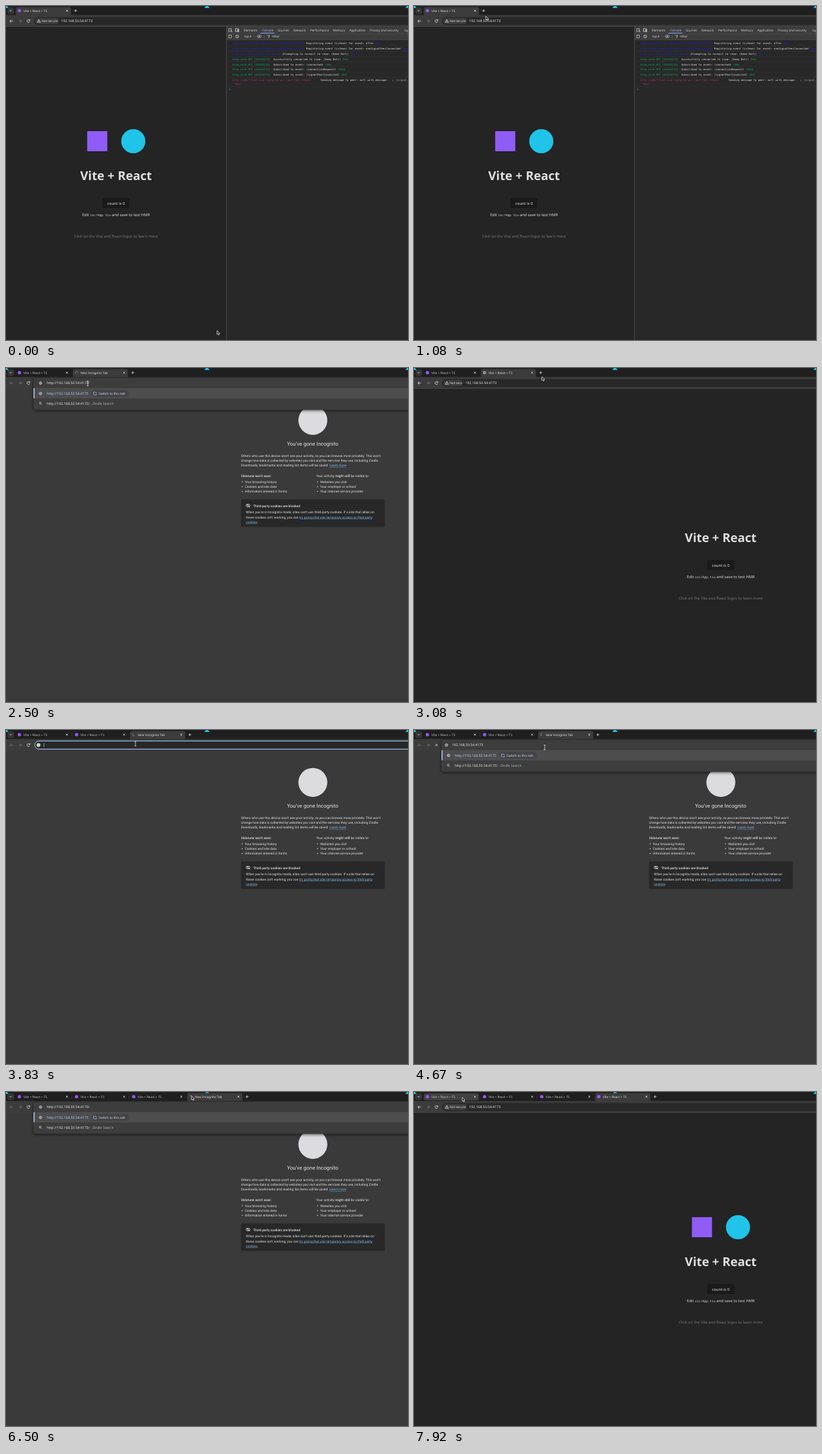
These frames come from a looping animation (600 by 499 pixels, 8000 ms). An HTML page with a canvas:

```html
<!DOCTYPE html>
<html lang="en">
<head>
<meta charset="utf-8">
<title>Opening peers in new tabs</title>
<style>
  html, body { margin: 0; width: 600px; height: 499px; overflow: hidden; background: #242424; }
  canvas { display: block; }
</style>
</head>
<body>
<canvas id="stage" width="600" height="499"></canvas>
<script>
const c = document.getElementById('stage').getContext('2d');
const LOOP = 8000, PITCH = 85.3;
const SANS = '"Noto Sans", sans-serif', ROBOTO = 'Roboto, sans-serif', MONO = '"DejaVu Sans Mono", monospace';
const HOST = '192.168.50.54:4173';
const BAR = '#3c3c3c', PILL = '#282828', LIGHT = '#e3e3e3', DIM = '#777', LINK = '#7fb2e8', CYAN = '#1fc4e8', PURPLE = '#8f5cf5';

// Life of each new tab, in ms
const sessions = [
  { open: -1e4, paste: -1e4, enter: -1e4, load: -1e4, icons: -1e4 },
  { open: 1575, paste: 2080, chip: 2330, enter: 2580, load: 3010, icons: 3170 },
  { open: 3500, paste: 4000, chip: 4170, enter: 4500, load: 4840, icons: 5000 },
  { open: 5825, paste: 6080, chip: 6500, enter: 6670, load: 6920, icons: 7080 }
];

// Pointer stops: time, x, y
const pointerPath = [
  [0, 315, 485], [200, 315, 485], [1150, 104, 8], [1560, 104, 8], [1670, 115, 15], [1950, 122, 23],
  [2580, 122, 23], [3080, 191, 13], [3350, 189, 8], [3550, 189, 8], [4000, 195, 26],
  [4900, 195, 26], [5600, 277, 6], [6800, 277, 6], [7850, 72, 8], [8000, 72, 8]
];

const clamp = v => Math.max(0, Math.min(1, v));

function pointerAt(t) {
  const i = pointerPath.findIndex(p => p[0] > t);
  const [t0, x0, y0] = pointerPath[i - 1], [t1, x1, y1] = pointerPath[i];
  const u = (t - t0) / (t1 - t0), e = u * u * (3 - 2 * u);
  return { x: x0 + (x1 - x0) * e, y: y0 + (y1 - y0) * e };
}

// Draws text and returns its right edge
function text(s, x, y, size, color, family = SANS, weight = 400, align = 'left') {
  c.font = `${weight} ${size}px ${family}`;
  c.fillStyle = color;
  c.textAlign = align;
  c.fillText(s, x, y);
  return x + c.measureText(s).width;
}

function rect(x, y, w, h, color, r = 0) {
  c.fillStyle = color;
  c.beginPath();
  c.roundRect(x, y, w, h, r);
  c.fill();
}

function dot(x, y, r, color) {
  c.fillStyle = color;
  c.beginPath();
  c.arc(x, y, r, 0, 7);
  c.fill();
}

function ring(x, y, r, color, from = 0, to = 7) {
  c.strokeStyle = color;
  c.lineWidth = 0.8;
  c.beginPath();
  c.arc(x, y, r, from, to);
  c.stroke();
}

function line(color, width, ...pts) {
  c.strokeStyle = color;
  c.lineWidth = width;
  c.beginPath();
  for (let i = 0; i < pts.length; i += 2) c.lineTo(pts[i], pts[i + 1]);
  c.stroke();
}

function cross(x, y, r, color) {
  line(color, 0.8, x - r, y - r, x + r, y + r);
  line(color, 0.8, x + r, y - r, x - r, y + r);
}

function plus(x, y, color) {
  line(color, 0.8, x - 2, y, x + 2, y);
  line(color, 0.8, x, y - 2, x, y + 2);
}

function arrow(x, y, dir, color) {
  line(color, 0.8, x - 2.2, y, x + 2.2, y);
  line(color, 0.8, x, y - 2.2, x + 2.2 * dir, y, x, y + 2.2);
}

function globe(x, y) {
  ring(x, y, 2, '#c8c8c8');
  line('#c8c8c8', 0.6, x - 2, y, x + 2, y);
  line('#c8c8c8', 0.6, x, y - 2, x, y + 2);
}

function link(s, x, y) {
  const end = text(s, x, y, 4.97, LINK, ROBOTO);
  line(LINK, 0.4, x, y + 0.9, end, y + 0.9);
  return end;
}

function drawTabs(t, active, mouse) {
  rect(0, 0, 600, 14, '#1f1f1f');
  for (const x of [0, 300, 600]) {
    c.fillStyle = CYAN;
    c.beginPath();
    c.moveTo(x - 4, 3);
    c.lineTo(x - 1.5, 0);
    c.lineTo(x + 1.5, 0);
    c.lineTo(x + 4, 3);
    c.fill();
  }
  rect(2, 2, 10, 10, '#353535', 3);
  line(LIGHT, 0.8, 5.4, 6.2, 7, 7.8, 8.6, 6.2);

  let right = 0;
  sessions.forEach((s, i) => {
    if (t < s.open) return;
    const x = 14.5 + PITCH * i;
    right = x + PITCH * clamp((t - s.open) / 235) - 2.8;
    const w = right - x, on = i === active;
    const hover = mouse.y < 13 && mouse.x > x && mouse.x < right;
    if (on) rect(x, 1.5, w, 14, BAR, 3);
    else if (hover) rect(x, 2, w, 10.5, '#414141', 3);
    else if (i < active - 1) line('#4a4a4a', 0.6, right + 1.4, 4.5, right + 1.4, 9.5);
    c.save();
    c.beginPath();
    c.rect(x, 0, Math.max(0, w - 11), 14);
    c.clip();
    const loaded = t >= s.load;
    if (t >= s.icons) dot(x + 5.5, 7, 2.5, PURPLE);
    else if (loaded) globe(x + 5.5, 7);
    else ring(x + 5.5, 7, 1.8, '#999', t / 120, t / 120 + 4);
    text(loaded ? 'Vite + React + TS' : 'New Incognito Tab', x + 11.5, 8.8, 4.63, on ? LIGHT : '#c4c4c4');
    c.restore();
    if (w > 12) cross(right - 6, 7, 1.4, '#ddd');
  });

  const px = right + 6.8;
  if (Math.hypot(mouse.x - px, mouse.y - 7) < 5.5) dot(px, 7, 5, '#505050');
  plus(px, 7, '#ddd');
}

function drawToolbar(t, s) {
  const loaded = t >= s.load;
  rect(0, 13.5, 600, 17.5, BAR);
  arrow(8, 22.5, -1, loaded ? LIGHT : DIM);
  arrow(21, 22.5, 1, DIM);
  if (!loaded && (t < s.open + 170 || t >= s.enter)) cross(33.5, 22.5, 1.6, LIGHT);
  else {
    ring(33.5, 22.5, 2, LIGHT, 0.4, 5.5);
    line(LIGHT, 0.8, 35.6, 20, 35.6, 21.7, 33.9, 21.7);
  }
  if (loaded) {
    rect(42, 16.5, 580, 12, PILL, 6);
    const w = Math.min(35, 18 + (t - s.load) * 0.16);
    rect(44, 18, w, 9, BAR, 4.5);
    c.save();
    c.beginPath();
    c.rect(44, 17, w - 2, 11);
    c.clip();
    line(LIGHT, 0.7, 49, 20, 51.4, 24.3, 46.6, 24.3, 49, 20);
    line(LIGHT, 0.6, 49, 21.5, 49, 23.3);
    text('Not secure', 53.3, 24.4, 4.7, LIGHT);
    c.restore();
    text(HOST, 47.3 + w, 24.4, 5.17, LIGHT);
    line('#484848', 0.6, 0, 30.7, 600, 30.7);
  } else if (t < s.paste) {
    rect(43, 16.5, 580, 12, PILL, 6);
    c.strokeStyle = '#a8c7fa';
    c.lineWidth = 1;
    c.beginPath();
    c.roundRect(43, 16.5, 580, 12, 6);
    c.stroke();
    dot(48.5, 22.5, 2.9, '#c9d3c4');
    line(LIGHT, 0.6, 56.8, 19.5, 56.8, 25.5);
  } else drawSuggestions(t, s);
}

function drawSuggestions(t, s) {
  c.save();
  c.shadowColor = '#000a';
  c.shadowBlur = 4;
  c.shadowOffsetY = 1;
  rect(41, 15, 580, 47.5, '#3d3d3d', 4);
  c.restore();
  if (t < s.enter) {
    globe(51.5, 22.5);
    text(`http://${HOST}/`, 60.7, 24.4, 5.17, LIGHT);
  } else {
    globe(48.5, 22.5);
    text(HOST, 56.5, 24.4, 5.17, LIGHT);
  }
  rect(41, 30, 560, 15.5, '#4d4d4e');
  rect(41, 30, 1.5, 15.5, '#a8c7fa', 0.7);
  globe(51.5, 38);
  text(`http://${HOST}`, 60.7, 39.8, 5.17, '#a8c7fa', SANS, 500);
  if (t >= s.chip) {
    rect(127, 33, 56, 10, '#434345', 5);
    line('#a8c7fa', 0.7, 133, 36, 130.5, 36, 130.5, 40, 135, 40, 135, 38);
    line('#a8c7fa', 0.7, 133, 36.5, 135.5, 36.5);
    text('Switch to this tab', 138.3, 39.8, 4.9, '#cfdcf2');
  }
  ring(51, 52.4, 1.4, '#c8c8c8');
  line('#c8c8c8', 0.8, 52, 53.4, 53.4, 54.8);
  const end = text(`http://${HOST}/`, 60.7, 54.9, 5.17, LIGHT);
  text(' - Zindle Search', end, 54.9, 5, '#b4b4b4');
}

function drawApp(cx, logos) {
  rect(0, 31, 600, 468, '#242424');
  if (logos) {
    rect(cx - 43, 187, 30, 30, PURPLE);
    dot(cx + 25.8, 202, 18, CYAN);
  }
  text('Vite + React', cx, 260, 18.2, '#e0e0e0', SANS, 700, 'center');
  rect(cx - 20.3, 287, 40.6, 15, '#1a1a1a', 3);
  text('count is 0', cx, 296.6, 5.75, '#e8e8e8', SANS, 500, 'center');
  let x = text('Edit ', cx - 50.5, 314.4, 5.72, '#dcdcdc');
  x = text('src/App.tsx', x, 314.4, 4.72, '#dcdcdc', '"Noto Sans Mono", monospace');
  text(' and save to test HMR', x, 314.4, 5.72, '#dcdcdc');
  text('Click on the Vite and React logos to learn more', cx, 345.8, 5.72, '#767676', SANS, 400, 'center');
}

function drawDevtools() {
  rect(329, 31, 271, 468, PILL);
  rect(329, 31, 271, 19.5, BAR);
  line('#5a5a5a', 0.7, 329, 31, 329, 499);
  line('#545454', 0.5, 329, 41, 600, 41);
  line('#545454', 0.5, 329, 50.5, 600, 50.5);
  c.strokeStyle = '#c8c8c8';
  c.lineWidth = 0.7;
  c.strokeRect(332.5, 34, 4, 4);
  line('#c8c8c8', 0.9, 335, 36, 338, 39);
  c.strokeRect(342.5, 34, 4.5, 4);
  rect(345.5, 35, 2, 4, '#c8c8c8');
  const names = ['Elements', 'Console', 'Sources', 'Network', 'Performance', 'Memory', 'Application', 'Privacy and security', 'Lighthouse'];
  const lefts = [355, 382, 405.5, 429, 454, 488, 512.5, 543, 594.5];
  names.forEach((n, i) => text(n, lefts[i], 37.8, 4.6, i === 1 ? '#a8c7fa' : '#d4d4d4'));
  rect(380, 40, 20.5, 1, '#7cacf8');

  c.strokeStyle = '#c8c8c8';
  c.lineWidth = 0.7;
  c.strokeRect(332.5, 43.5, 4, 4);
  ring(345, 45.5, 2.2, '#c8c8c8');
  line('#c8c8c8', 0.7, 343.5, 44, 346.5, 47);
  text('top ▾', 355.5, 47.2, 4.6, '#d4d4d4');
  c.beginPath();
  c.ellipse(378, 45.5, 3, 1.8, 0, 0, 7);
  c.stroke();
  dot(378, 45.5, 0.9, '#c8c8c8');
  line('#5a5a5a', 0.6, 371, 43, 371, 48);
  line('#5a5a5a', 0.6, 385.5, 43, 385.5, 48);
  line('#c8c8c8', 0.7, 390, 44, 394, 44, 392, 46, 392, 48);
  text('Filter', 397.5, 47.2, 4.6, '#d4d4d4');

  const blue = '#2020dc', green = '#0aa860', pink = '#b42c74', core = 'http:core:RTC [414341f4]';
  const back = 'http-signal-back-end/events:[e4f4d360]:network ';
  const log = [
    [blue, back, 'Registering event listener for event: offer'],
    [blue, back, 'Registering event listener for event: newSignalPeerConnected'],
    [blue, 'http:core:RTC [414341f4]:onSave ', 'Attempting to connect to room: (Demo Hall)'],
    [green, core, 'Successfully connected to room: (Demo Hall)'],
    [green, core, 'Subscribed to event: (connected)'],
    [green, core, 'Subscribed to event: (connectionRequest)'],
    [green, core, 'Subscribed to event: (signalPeerConnected)'],
    [pink, 'http-signal-back-end/signalServer:[abc7c40]:onSave      ', 'Sending message to peer: null with message: ']
  ];
  const put = (s, x, y, color) => text(s, x, y, 3.9, color, MONO);
  log.forEach(([color, tag, message], i) => {
    const y = 57 + 7.88 * i;
    let x = put(tag.trim(), 338, y, color);
    x = 338 + c.measureText(tag.padEnd(26)).width;
    x = put(message, x, y, '#e0e0e0');
    if (i < 7) {
      put(i === 5 ? ' +10ms' : ' +0ms', x, y, color);
      line('#353535', 0.5, 330, y + 2.4, 600, y + 2.4);
    } else {
      put('▸ {signal: 1}', 577, y, '#a0a0a0');
      put('+0ms', 341, y + 6.3, color);
    }
  });
  line('#353535', 0.5, 330, 121.2, 600, 121.2);
  line('#5b82c4', 0.7, 333, 123.2, 334.6, 124.6, 333, 126);
}

function drawIncognito() {
  const ink = '#e3e3e3', size = 4.97;
  const put = (s, x, y, weight = 400) => text(s, x, y, size, ink, ROBOTO, weight);
  rect(0, 31, 600, 468, '#3b3a3b');
  dot(458, 78.3, 21.6, '#dcdcde');
  text("You've gone Incognito", 457.7, 116.4, 7.86, ink, ROBOTO, 400, 'center');
  put("Others who use this device won't see your activity, so you can browse more privately. This won't", 350.7, 133);
  put('change how data is collected by websites you visit and the services they use, including Zindle.', 350.7, 140.2);
  link('Learn more', put('Downloads, bookmarks and reading list items will be saved. ', 350.7, 147.4), 147.4);

  put("Velorune won't save:", 350.7, 163, 500);
  let x = put('Your activity ', 463, 163);
  x = put('might still', x, 163, 500);
  put(' be visible to:', x, 163);
  const lists = [
    ['Your browsing history', 'Cookies and site data', 'Information entered in forms'],
    ['Websites you visit', 'Your employer or school', 'Your internet service provider']
  ];
  lists.forEach((items, col) => items.forEach((s, row) => {
    const left = 352.5 + 112.5 * col, y = 171.8 + 7.2 * row;
    dot(left, y - 1.7, 0.75, ink);
    put(s, left + 4, y);
  }));

  rect(350.7, 196.3, 214.6, 41.2, '#282828', 1.5);
  c.strokeStyle = ink;
  c.lineWidth = 0.8;
  c.beginPath();
  c.ellipse(361.3, 205.5, 3, 2, 0, 0, 7);
  c.stroke();
  dot(361.3, 205.5, 0.9, ink);
  line(ink, 0.8, 358.7, 202.8, 364, 208.2);
  put('Third-party cookies are blocked', 369, 207.5, 500);
  put("When you're in Incognito mode, sites can't use third-party cookies. If a site that relies on", 358, 217.4);
  x = put("these cookies isn't working, you can ", 358, 224.6);
  link('try giving that site temporary access to third-party', x, 224.6);
  put('.', link('cookies', 358, 231.8), 231.8);
}

function drawPointer({ x, y }) {
  if (y > 18 && y < 29) {
    line('#ddd', 0.8, x, y - 3.5, x, y + 3.5);
    line('#ddd', 0.8, x - 1.3, y - 3.5, x + 1.3, y - 3.5);
    line('#ddd', 0.8, x - 1.3, y + 3.5, x + 1.3, y + 3.5);
    return;
  }
  c.save();
  c.translate(x, y);
  c.beginPath();
  for (const [px, py] of [[0, 0], [0, 5.6], [1.3, 4.5], [2.3, 6.6], [3.3, 6.1], [2.4, 4.1], [4, 4]]) c.lineTo(px, py);
  c.closePath();
  c.fillStyle = '#0a0a0a';
  c.strokeStyle = '#e8e8e8';
  c.lineWidth = 0.8;
  c.fill();
  c.stroke();
  c.restore();
}

function draw(t) {
  const active = sessions.filter(s => t >= s.open).length - 1;
  const s = sessions[active], mouse = pointerAt(t);
  c.textRendering = 'geometricPrecision';
  if (t >= s.load) drawApp(active ? 457.8 : 164.2, t >= s.icons);
  else drawIncognito();
  if (!active) drawDevtools();
  drawTabs(t, active, mouse);
  drawToolbar(t, s);
  drawPointer(mouse);
}

const start = performance.now();
function frame() {
  draw((performance.now() - start) % LOOP);
  requestAnimationFrame(frame);
}
frame();
</script>
</body>
</html>
```
